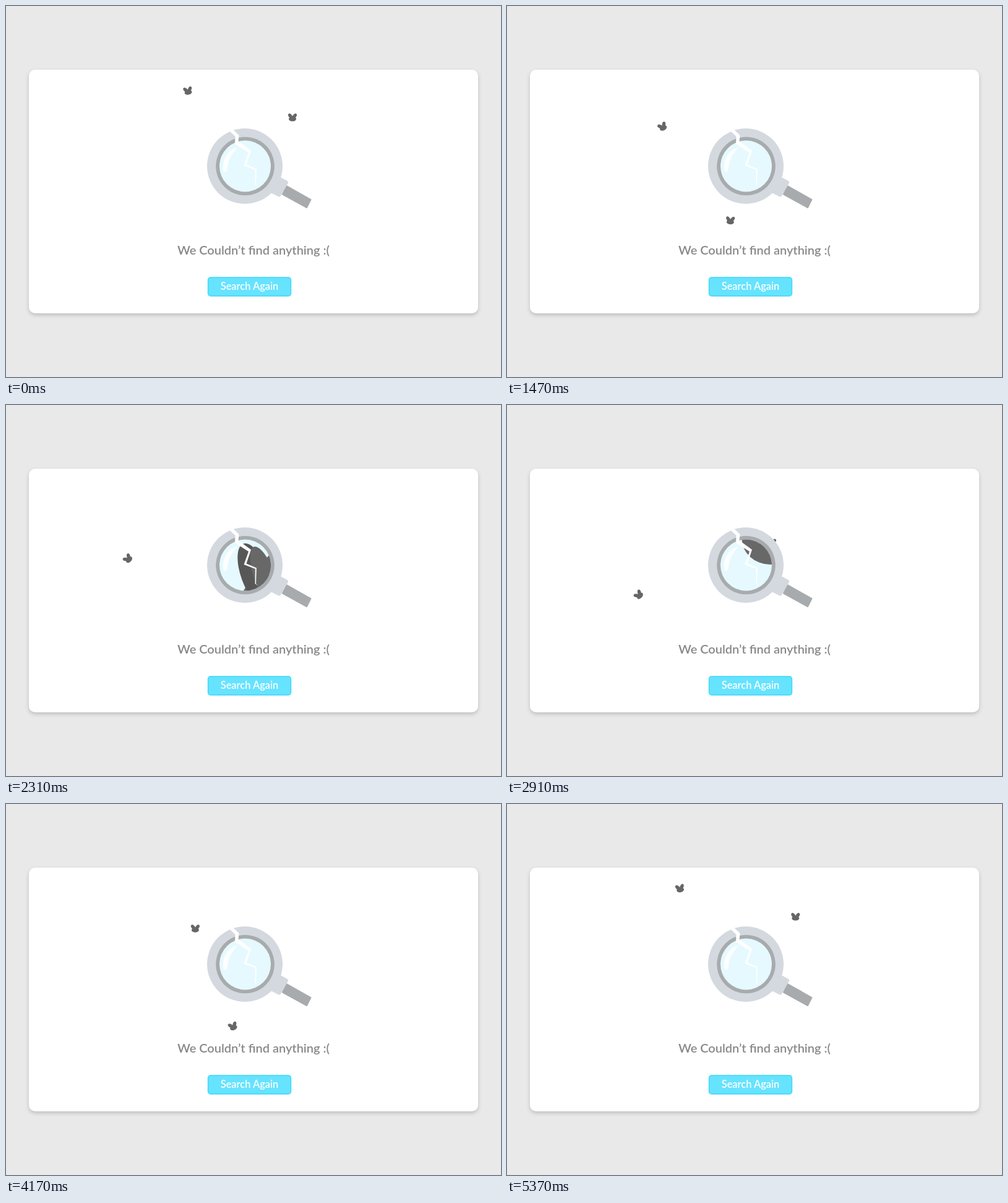
Animation of 800 by 600 pixels, one loop 5.4 s. Source, as an HTML page:

```html
<!DOCTYPE html>
<html lang="en">
<head>
<meta charset="utf-8">
<title>No results</title>
<style>
  html, body { margin: 0; width: 100%; height: 100%; overflow: hidden; background: #e9e9e9; }
  svg { display: block; width: 100vw; height: 100vh; }
  text { font-family: Lato, "Open Sans", sans-serif; font-weight: 600; text-anchor: middle; }
  .card { fill: #fff; filter: drop-shadow(0 3px 3px rgba(0, 0, 0, .18)); }
</style>
</head>
<body>
<svg viewBox="0 0 800 600">
  <defs>
    <clipPath id="lens"><circle cx="386.5" cy="259" r="41.5"/></clipPath>
    <g id="fly" fill="#666">
      <ellipse rx="2.8" ry="4.8" transform="translate(-3.3 -1.8) rotate(-36)"/>
      <ellipse rx="2.8" ry="4.8" transform="translate(3.3 -1.8) rotate(36)"/>
      <ellipse cy="2.7" rx="6" ry="3.8"/>
    </g>
  </defs>

  <rect class="card" x="37" y="103" width="726" height="394" rx="10"/>

  <use id="flyA" href="#fly"/>
  <use id="flyB" href="#fly"/>

  <!-- magnifier -->
  <g stroke-linejoin="round">
    <path d="M453.5 291 492.5 313 486 326 447 304.5Z" fill="#a8abad" stroke="#a8abad" stroke-width="2"/>
    <path d="M441 279 453 285.5 441.5 305.5 427 298Z" fill="#d4d9df" stroke="#d4d9df" stroke-width="6"/>
  </g>
  <circle cx="386" cy="259" r="61" fill="#d4d9df"/>
  <circle cx="386.5" cy="259" r="47.3" fill="#a8abad"/>
  <circle cx="386.5" cy="259" r="41.5" fill="#e6f9ff"/>
  <g clip-path="url(#lens)">
    <g id="closeUp" fill="#686868">
      <ellipse rx="46" ry="42"/>
      <ellipse rx="22" ry="50" transform="translate(11 -54) rotate(35)"/>
      <ellipse rx="22" ry="54" fill="#575757" transform="translate(-23.5 -43) rotate(-20)"/>
      <ellipse rx="17" ry="54" transform="translate(-6.5 -38) rotate(-20)"/>
    </g>
  </g>
  <g fill="#fff">
    <path d="M374 229C360 231 349 247 351 265C352 270 357 269 357.5 264C359 249 365 239 374 229Z" opacity=".88"/>
    <path d="M362 203 367 200 376.500 209 375.500 219 396 234 388.500 256.500 404.800 263.500 404 289 407 292 402.500 289 402.800 265 384.500 258 392 237 370 223 370.500 211Z"/>
  </g>

  <text x="400" y="402" font-size="20" fill="#888">We Couldn’t find anything :(</text>
  <rect x="326.5" y="439" width="134" height="30" rx="4" fill="#66e3ff" stroke="#38d8f7" stroke-width="1.3"/>
  <text x="393.5" y="459.3" font-size="16.4" fill="#fff">Search Again</text>
</svg>

<script>
const LOOP = 5400, STEP = 30, LEG = 600;
const $ = id => document.getElementById(id);

// One waypoint per leg of the flight
const routeA = [[294, 137], [324, 246], [330, 352], [401, 317], [410, 268],
                [426, 214], [374, 174], [302, 202], [218, 200], [283, 133]];
const routeB = [[463, 180], [390, 168], [290, 185], [215, 211], [197, 256],
                [218, 314], [267, 341], [372, 358], [470, 278], [466, 177]];

// Catmull-Rom spline, straight-ended at the first and last waypoint
function along(route, t) {
  const i = Math.floor(t / LEG), u = t / LEG - i;
  const a = route[i], b = route[i + 1];
  return [0, 1].map(k => {
    const d = b[k] - a[k];
    const out = i > 0 ? (b[k] - route[i - 1][k]) / 2 : d;
    const into = i + 2 < route.length ? (route[i + 2][k] - a[k]) / 2 : d;
    return a[k] + u * (out + u * (3 * d - 2 * out - into + u * (out + into - 2 * d)));
  });
}

function place(id, [x, y], tilt = 0) {
  $(id).setAttribute("transform", `translate(${x} ${y}) rotate(${tilt})`);
}

const start = performance.now();

function draw() {
  const elapsed = performance.now() - start + 1;
  const t = Math.floor(elapsed % LOOP / STEP) * STEP;
  const turn = Math.sin(Math.PI * t / LOOP) ** 2;
  place("flyA", along(routeA, t), -12 + 27 * turn);
  place("flyB", along(routeB, t), -50 * turn);
  place("closeUp", [425.5, 318 - 0.17 * (t - 2310)]);
  requestAnimationFrame(draw);
}

draw();
</script>
</body>
</html>
```
